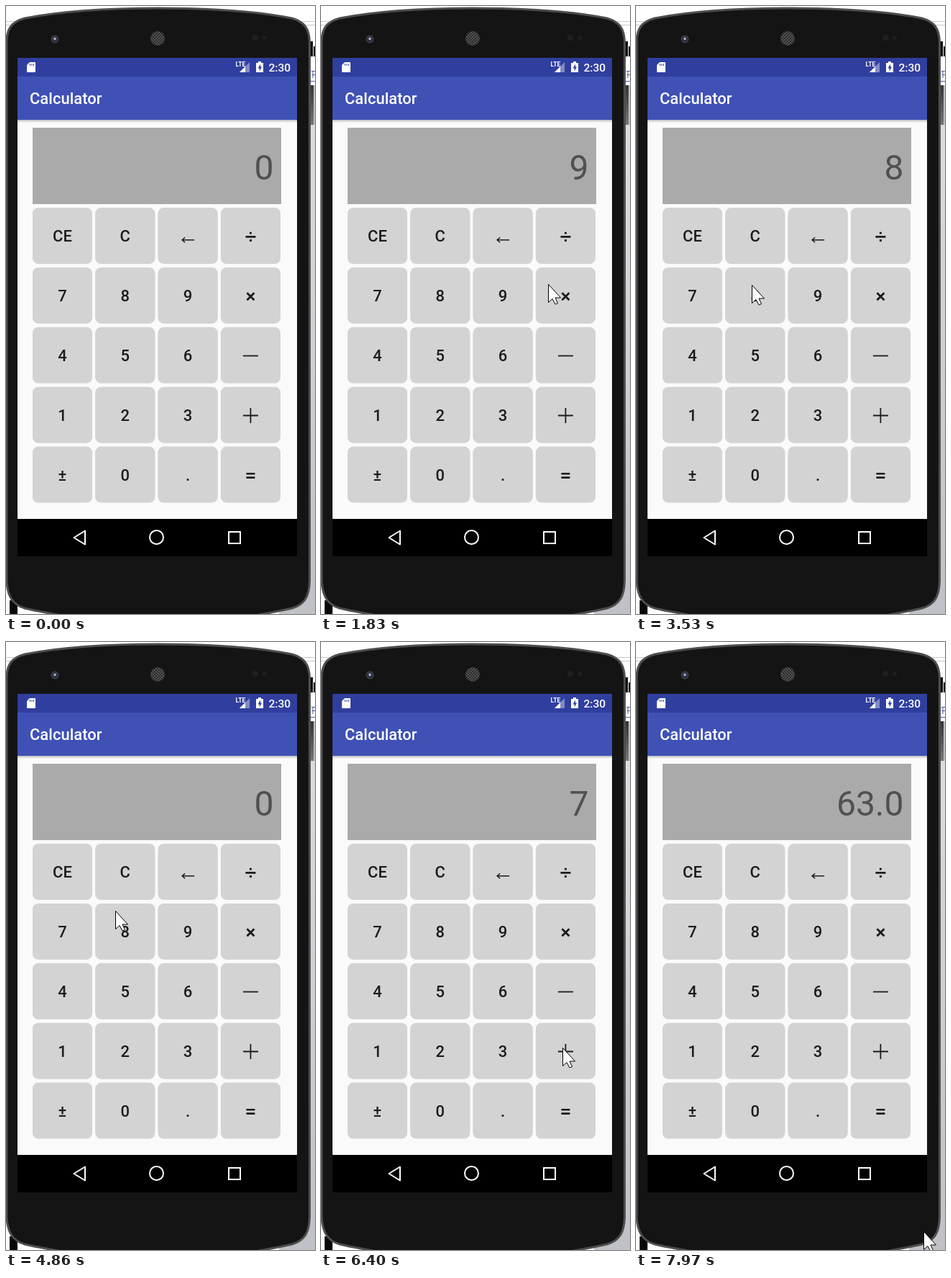
These frames come from a looping animation (430 px wide and 844 px high, 7.99 s). An HTML page:

```html
<!DOCTYPE html>
<html lang="en">
<head>
<meta charset="utf-8">
<title>Calculator</title>
<style>
  html, body { margin: 0; width: 100%; height: 100%; overflow: hidden; background: #fff; }
  svg { display: block; width: 100%; height: 100%; }
  text { font-family: Roboto, Arial, sans-serif; }
  .medium { font-weight: 500; }
</style>
</head>
<body>
<svg viewBox="0 0 430 844">
  <defs>
    <linearGradient id="wall" x1="0" y1="0" x2="0" y2="1">
      <stop offset="0" stop-color="#dcdce0"/>
      <stop offset="1" stop-color="#c0c0c7"/>
    </linearGradient>
    <linearGradient id="strip" x1="0" y1="0" x2="0" y2="1">
      <stop offset="0" stop-color="#333"/>
      <stop offset="1" stop-color="#777"/>
    </linearGradient>
    <linearGradient id="shade" x1="0" y1="0" x2="0" y2="1">
      <stop offset="0" stop-color="#bdbdbd"/>
      <stop offset="1" stop-color="#fafafa"/>
    </linearGradient>
    <pattern id="mesh" width="4" height="4" patternUnits="userSpaceOnUse">
      <rect width="4" height="4" fill="#2b2b2b"/>
      <circle cx="1" cy="1" r=".9" fill="#666"/>
      <circle cx="3" cy="3" r=".9" fill="#666"/>
    </pattern>
  </defs>

  <!-- desktop behind the phone -->
  <rect width="430" height="844" fill="#fff"/>
  <path d="M0 21.500H430M0 26.500H430" stroke="#c8c8c8"/>
  <rect x="380" y="165" width="50" height="679" fill="url(#wall)"/>
  <rect x="424" y="110" width="4" height="55" fill="url(#strip)"/>
  <rect x="428" y="110" width="2" height="55" fill="#bbb"/>
  <path d="M424 49H427V70H424ZM428 56H430V70H428Z"/>
  <path d="M425 90.500H430M426 95.500H430M427 91V100M424 104.500H430" stroke="#4a5a9a"/>
  <rect x="5" y="825" width="11" height="19" fill="#080808"/>

  <!-- phone body -->
  <path d="M1 50C1 31 8 22 26 17C80 6.500 140 3 212 3S345 6.500 398 17C415 22 422 31 422.500 50V798C422 819 416 831 398 836C382 840 358 844 335 848H90C66 844 42 840 26 836C9 831 2 819 1 798Z"
    fill="#141414" stroke="#4c4e4e" stroke-width="3"/>
  <circle cx="68" cy="46" r="5.500" fill="#3c3e42"/>
  <circle cx="68" cy="46" r="3.500" fill="#20243a"/>
  <circle cx="68" cy="45.500" r="2" fill="#a0a6ba"/>
  <circle cx="211" cy="45" r="10" fill="url(#mesh)"/>
  <circle cx="347" cy="44" r="4.500" fill="#1e1e1e"/>
  <circle cx="360" cy="44" r="3" fill="#1e1e1e"/>

  <!-- screen -->
  <rect x="16" y="72" width="389" height="692" fill="#fafafa"/>
  <rect x="16" y="72" width="389" height="26" fill="#303f9f"/>
  <rect x="16" y="98" width="389" height="60" fill="#3f51b5"/>
  <rect x="16" y="158" width="389" height="4" fill="url(#shade)"/>
  <path d="M33 78H40Q41 78 41 79V91Q41 92 40 92H30Q29 92 29 91V82Z" fill="#fff"/>
  <path d="M33.500 80V83M36 80V83M38.500 80V83" stroke="#303f9f"/>
  <path d="M339 78V92H325Z" fill="#fff" opacity=".4"/>
  <path d="M333 84V92H325Z" fill="#fff"/>
  <text x="319.500" y="84" font-size="8.500" font-weight="700" fill="#fff">LTE</text>
  <path d="M351 77H355V79H358V92H348V79H351Z" fill="#fff"/>
  <path d="M354 80.500L350.500 86.500H352.700V90.500L356 84.500H354Z" fill="#303f9f"/>
  <text class="medium" x="365.500" y="91" font-size="15.500" fill="#fff">2:30</text>
  <text class="medium" x="33" y="136" font-size="22" fill="#fff">Calculator</text>

  <rect x="37" y="169" width="346" height="106" fill="#aaa"/>
  <text id="display" x="372.500" y="241" font-size="48" text-anchor="end" fill="#505050">0</text>
  <g id="keys"></g>

  <rect x="16" y="712" width="389" height="52"/>
  <g fill="none" stroke="#fff" stroke-width="2">
    <path d="M94.500 738L110 728.500V747.500Z" stroke-linejoin="round"/>
    <circle cx="209.500" cy="737.500" r="9.500"/>
    <rect x="310" y="730" width="16" height="16"/>
  </g>
  <path id="cursor" d="M.5 .5V25.500L6 20.500L10 28L13.500 26.500L10 19H17.500Z" fill="#fff" stroke="#000"/>
</svg>
<script>
const LOOP = 7990;
const NS = "http://www.w3.org/2000/svg";
const display = document.getElementById("display");
const cursor = document.getElementById("cursor");
const keys = document.getElementById("keys");

function add(tag, attrs, text = "") {
  const el = document.createElementNS(NS, tag);
  for (const name in attrs) el.setAttribute(name, attrs[name]);
  el.textContent = text;
  keys.append(el);
}

// Operator symbols: stroke width and lines around the key's centre
const symbols = {
  "←": [1.5, "M9 5H-8M-4 1.5L-8 5L-4 8.5"],
  "÷": [2.8, "M-7 .5H7M-1.5 -4.7H1.5M-1.5 5.7H1.5"],
  "×": [2.8, "M-5 -4.5L5 5.5M5 -4.5L-5 5.5"],
  "−": [1.8, "M-10.5 0H10.5"],
  "+": [1.8, "M-10.5 0H10.5M0 -10.5V10.5"],
  "=": [2.6, "M-6 -2.2H6M-6 3.2H6"]
};
const rows = ["CE C ← ÷", "7 8 9 ×", "4 5 6 −", "1 2 3 +", "± 0 . ="];

rows.forEach((row, r) => row.split(" ").forEach((label, c) => {
  const x = 37 + c * 87.3, y = 280 + r * 82.9;
  const cx = x + 41.5, cy = y + 39.8;
  const box = { x, width: 83, height: 77, rx: 8 };
  add("rect", { ...box, y: y + 1, fill: "#c4c4c4", opacity: .7 });
  add("rect", { ...box, y, fill: "#d3d3d3" });
  if (symbols[label]) {
    const [width, d] = symbols[label];
    add("path", {
      d, transform: `translate(${cx} ${cy})`,
      fill: "none", stroke: "#1c1c1c", "stroke-width": width
    });
  } else {
    add("text", {
      class: "medium", x: cx, y: cy + 7.5, "font-size": 22,
      "text-anchor": "middle", fill: "#1c1c1c"
    }, label);
  }
}));

// Pointer moves; it rests wherever one move ends before the next starts.
const entry = { x: 358, y: 848 };
const moves = [
  { from: 100, to: 850, x: 224, y: 379 },
  { from: 930, to: 1090, x: 229, y: 372 },
  { from: 1090, to: 1830, x: 316, y: 386 },
  { from: 1980, to: 2250, x: 363, y: 413 },
  { from: 2250, to: 2730, x: 206, y: 380 },
  { from: 2830, to: 3200, x: 178, y: 392 },
  { from: 3350, to: 3530, x: 161, y: 387 },
  { from: 3530, to: 4110, x: 109, y: 324 },
  { from: 4210, to: 4400, x: 90, y: 334 },
  { from: 4400, to: 4960, x: 158, y: 376 },
  { from: 5060, to: 5300, x: 233, y: 370 },
  { from: 5300, to: 5830, x: 56, y: 397 },
  { from: 5960, to: 6400, x: 336, y: 563 },
  { from: 6400, to: 6730, x: 390, y: 659 },
  { from: 6830, to: 7150, x: 342, y: 652 },
  { from: 7350, to: 7640, x: 365, y: 683 },
  { from: 7640, to: 7970, x: 400, y: 818 }
];

const readout = [
  [0, "0"], [1200, "9"], [2860, "8"], [4240, "0"], [5990, "7"], [7300, "63.0"]
];

const ease = u => u * u * (3 - 2 * u);
const mix = (a, b, k) => Math.round(a + (b - a) * k);

function pointer(t) {
  const i = moves.findLastIndex(m => t >= m.from);
  if (i < 0) return null;
  const a = moves[i - 1] || entry, b = moves[i];
  const k = ease(Math.min(1, (t - b.from) / (b.to - b.from)));
  return [mix(a.x, b.x, k), mix(a.y, b.y, k)];
}

function draw(t) {
  display.textContent = readout.findLast(([at]) => t >= at)[1];
  const at = pointer(t);
  cursor.style.display = at ? "" : "none";
  if (at) cursor.setAttribute("transform", `translate(${at})`);
}

const start = performance.now();
function tick() {
  draw((performance.now() - start) % LOOP);
  requestAnimationFrame(tick);
}
tick();
</script>
</body>
</html>
```
